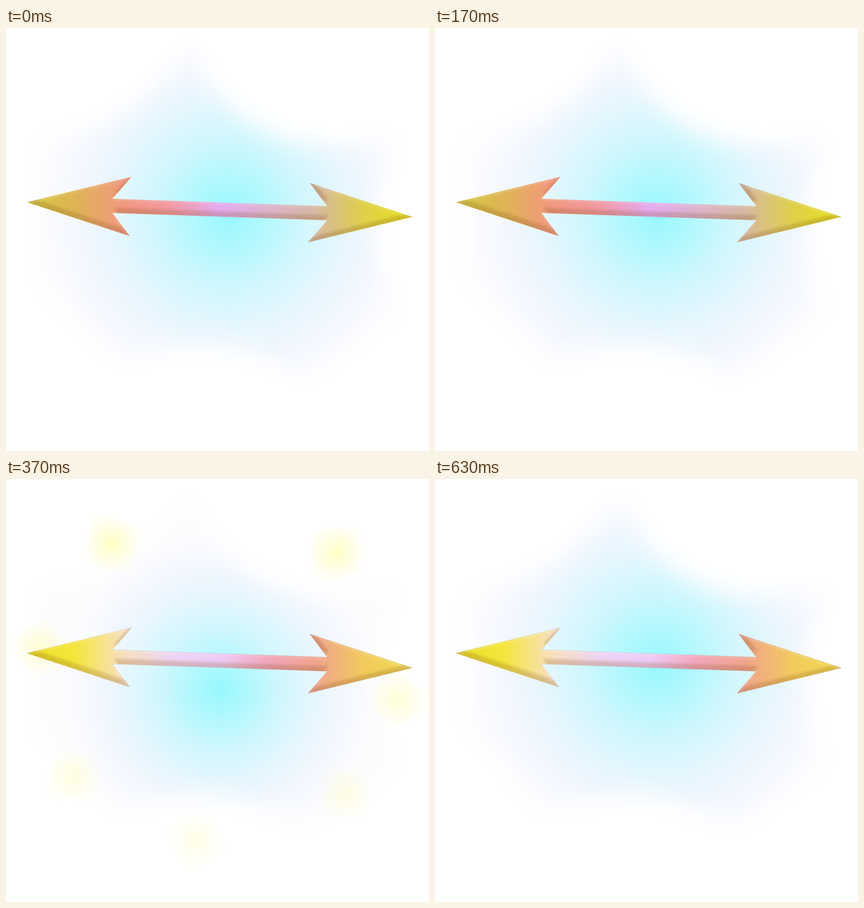
An HTML page with a canvas that plays this animation: 748x748 px, repeating every 660 ms.

```html
<!DOCTYPE html>
<html lang="en">
<head>
<meta charset="utf-8">
<title>Glowing arrow</title>
<style>
html, body { margin: 0; width: 100%; height: 100%; overflow: hidden; background: #fff; }
canvas { display: block; width: 748px; height: 748px; }
</style>
</head>
<body>
<canvas id="stage" width="748" height="748"></canvas>
<script>
const SIZE = 748, LOOP = 660;
const ctx = document.getElementById('stage').getContext('2d');

const STAR_TIPS = [[322, 20], [702, 188], [697, 502], [528, 624], [200, 596], [52, 442], [54, 194]];
const FLAME_ANGLES = [8, 45, 97, 143, 190, 234, 311];

// One arrow head; the other end is its half turn about the middle
const MIDDLE = [378, 321];
const HEAD = [[188, 327], [219, 368], [37, 308], [222, 263], [188, 302]];
const ARROW = [...HEAD, ...HEAD.map(([x, y]) => [2 * MIDDLE[0] - x, 2 * MIDDLE[1] - y])];

const GLOWS = {
  full: { x: 393, y: 328, reach: 330 },
  high: { x: 395, y: 314, reach: 300 },
  low: { x: 378, y: 372, reach: 270 },
  mid: { x: 378, y: 354, reach: 270 }
};

// Colours at even steps from the left tip to the right tip
const SKINS = {
  warm: {
    body: ['#d4cb40', '#dfb455', '#f2987f', '#f19aa4', '#e3abf0', '#dcb4cc', '#d7b8a2', '#dfd048', '#e6e020'],
    edge: 0
  },
  pale: {
    body: ['#ece024', '#f4e63c', '#f8dfc0', '#eed4f2', '#eeccf8', '#f2a6bc', '#f0a48c', '#f2cb5c', '#efdb55'],
    edge: .25
  }
};

// Flames turn back by degrees; no turn means no flames
const STEPS = [
  { at: 0, glow: 'full', skin: 'warm' },
  { at: 70, glow: 'mid', skin: 'warm', turn: 40 },
  { at: 170, glow: 'full', skin: 'warm' },
  { at: 270, glow: 'high', skin: 'warm', turn: 19 },
  { at: 340, glow: 'full', skin: 'pale' },
  { at: 370, glow: 'low', skin: 'pale', turn: 0 },
  { at: 500, glow: 'mid', skin: 'pale', turn: -11 },
  { at: 630, glow: 'full', skin: 'pale' }
];

function polygon(c, pts) {
  c.beginPath();
  pts.forEach(([x, y], i) => i ? c.lineTo(x, y) : c.moveTo(x, y));
  c.closePath();
}

function ramp(gradient, colors) {
  colors.forEach((color, i) => gradient.addColorStop(i / (colors.length - 1), color));
  return gradient;
}

function layer() {
  const el = document.createElement('canvas');
  el.width = el.height = SIZE;
  return el;
}

// Wider gaps between tips sink deeper toward the centre
function starPath(c, cx, cy) {
  c.beginPath();
  STAR_TIPS.forEach(([x, y], i) => {
    const [nx, ny] = STAR_TIPS[(i + 1) % STAR_TIPS.length];
    const mx = (x + nx) / 2, my = (y + ny) / 2;
    const pull = Math.max(0, Math.hypot(nx - x, ny - y) - 250) / 230;
    if (!i) c.moveTo(x, y);
    c.quadraticCurveTo(mx + (cx - mx) * pull, my + (cy - my) * pull, nx, ny);
  });
}

function drawGlow(c, { x, y, reach }) {
  const el = layer(), g = el.getContext('2d');
  g.filter = 'blur(20px)';
  starPath(g, 390, 330);
  g.fill();
  g.filter = 'none';
  g.globalCompositeOperation = 'source-in';
  g.fillStyle = ramp(g.createRadialGradient(x, y, 0, x, y, reach),
    ['#96f8fd', '#b3f8fd', '#d0f7fd', '#e5f6fe', '#f3f7fe', '#fcfcff']);
  g.fillRect(0, 0, SIZE, SIZE);
  c.drawImage(el, 0, 0);
}

function drawFlame(c, angle) {
  const x = 375 + 378 * Math.cos(angle), y = 350 + 350 * Math.sin(angle);
  const tint = a => `rgba(255,253,160,${a})`;
  c.save();
  c.translate(x, y);
  c.rotate(angle + Math.PI);
  c.globalAlpha = .6 - .28 * Math.sin(angle);
  c.filter = 'blur(4px)';
  c.fillStyle = ramp(c.createRadialGradient(58, 0, 0, 58, 0, 68), [tint(.8), tint(.42), tint(.12), tint(0)]);
  polygon(c, [[-4, 0], [60, -58], [125, 0], [60, 58]]);
  c.fill();
  c.restore();
}

// Tints the inside of the arrow along the edges facing away from (dx, dy)
function bevel(c, dx, dy, blur, color) {
  c.save();
  c.translate(dx, dy);
  c.filter = `blur(${blur}px)`;
  c.fillStyle = color;
  polygon(c, ARROW);
  c.rect(-SIZE, -SIZE, 3 * SIZE, 3 * SIZE);
  c.fill('evenodd');
  c.restore();
}

function drawArrow(c, { body, edge }) {
  c.save();
  polygon(c, ARROW);
  c.fillStyle = ramp(c.createLinearGradient(37, 0, 719, 0), body);
  c.fill();
  c.clip();
  bevel(c, 3, -9, 2, 'rgba(125,75,25,.22)');
  bevel(c, 0, 4, 2, 'rgba(255,255,255,.15)');
  c.restore();
  polygon(c, ARROW);
  c.strokeStyle = `rgba(125,105,80,${edge})`;
  c.setLineDash([3, 3]);
  c.stroke();
}

function render({ glow, skin, turn }) {
  const el = layer(), c = el.getContext('2d');
  c.fillStyle = '#fff';
  c.fillRect(0, 0, SIZE, SIZE);
  drawGlow(c, GLOWS[glow]);
  if (turn !== undefined) FLAME_ANGLES.forEach(a => drawFlame(c, (a + turn) * Math.PI / 180));
  drawArrow(c, SKINS[skin]);
  return el;
}

const pictures = STEPS.map(render);
const start = performance.now();

function tick() {
  const t = (performance.now() - start) % LOOP;
  const i = STEPS.filter(s => s.at <= t).length - 1;
  ctx.drawImage(pictures[i], 0, 0);
  requestAnimationFrame(tick);
}
tick();
</script>
</body>
</html>
```
